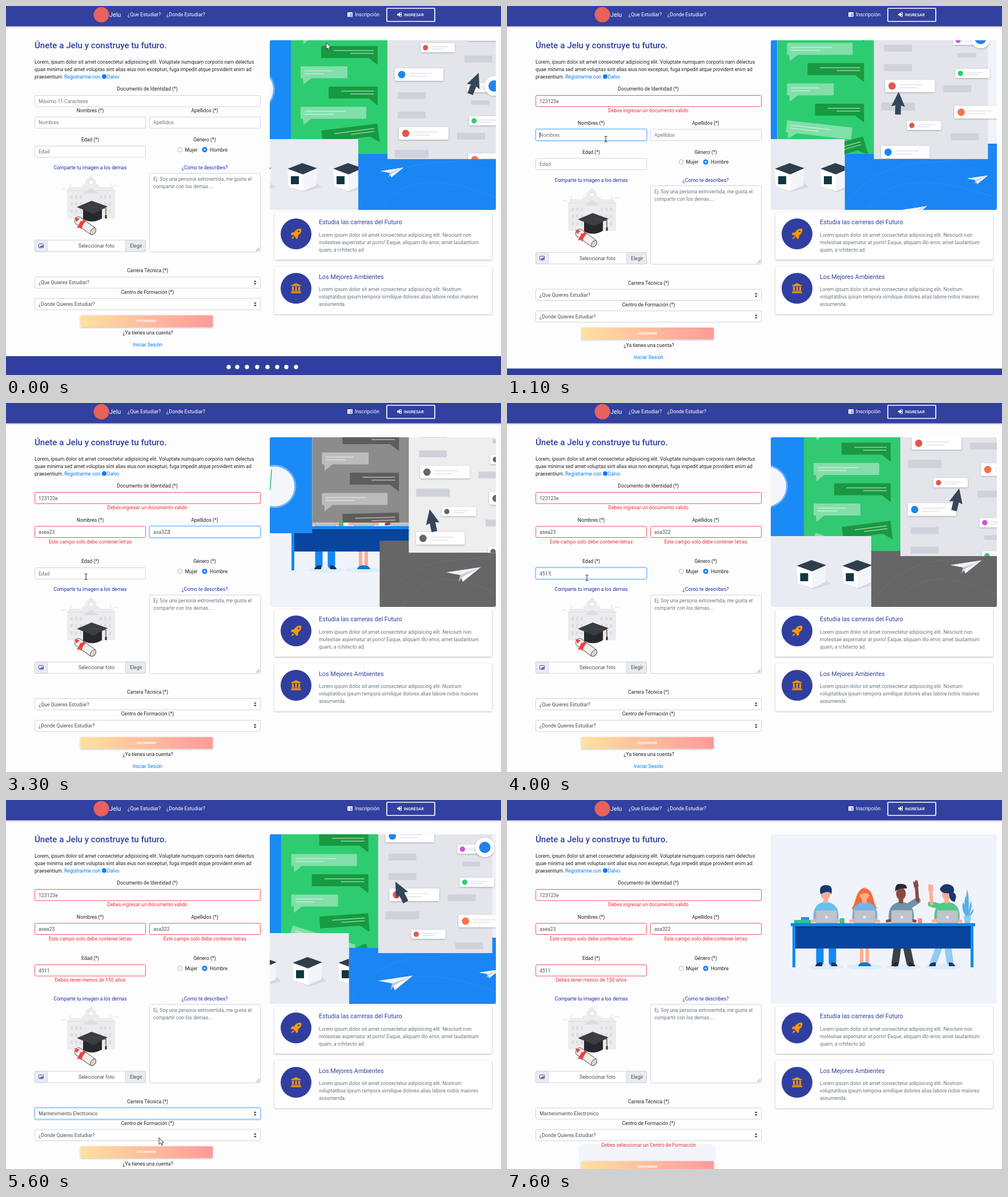
An HTML page that plays this animation: 867x646 px, repeating every 7700 ms.

```html
<!DOCTYPE html>
<html lang="es">
<head>
<meta charset="utf-8">
<style>
html, body { margin: 0; width: 100%; height: 100%; overflow: hidden; background: #fdfdfe; }
svg { display: block; width: 867px; height: 646px; font-family: Roboto, Arial, sans-serif; }
</style>
</head>
<body>
<svg id="stage" viewBox="0 0 867 646" xmlns="http://www.w3.org/2000/svg"></svg>
<script>
const LOOP = 7700, SCENE_LOOP = 4900, STEP = 100, ROW = 21.6;
const INK = '#212529', MUTED = '#6c757d', INDIGO = '#303f9f', LINK = '#007bff', RED = '#f0303c', BORDER = '#ced4da';

const clamp = x => Math.max(0, Math.min(1, x));
const ease = (t, a, b) => { const k = clamp((t - a) / (b - a)); return 1 - (1 - k) ** 2; };
const lerp = (a, b, k) => a + (b - a) * k;

// Piecewise linear track: rows of [time, ...values], extended past both ends.
function track(keys, t) {
  let i = 1;
  while (i < keys.length - 1 && t > keys[i][0]) i++;
  const a = keys[i - 1], b = keys[i], k = (t - a[0]) / (b[0] - a[0]);
  return a.slice(1).map((v, j) => lerp(v, b[j + 1], k));
}

function mix(from, to, k) {
  const part = (c, i) => parseInt(c.substr(1 + 2 * i, 2), 16);
  return `rgb(${[0, 1, 2].map(i => Math.round(lerp(part(from, i), part(to, i), k)))})`;
}

const rect = (x, y, w, h, fill, r = 0, more = '') =>
  `<rect x="${x}" y="${y}" width="${Math.max(0, w)}" height="${Math.max(0, h)}" rx="${r}" fill="${fill}" ${more}/>`;
const dot = (x, y, r, fill, more = '') => `<circle cx="${x}" cy="${y}" r="${r}" fill="${fill}" ${more}/>`;
const path = (d, fill, more = '') => `<path d="${d}" fill="${fill}" ${more}/>`;
const limb = (d, color, w) => path(d, 'none', `stroke="${color}" stroke-width="${w}" stroke-linecap="round" stroke-linejoin="round"`);
const group = (transform, body) => `<g transform="${transform}">${body}</g>`;
const text = (x, y, s, fill = INK, size = 8.69, more = '') =>
  `<text x="${x}" y="${y + size * .35}" fill="${fill}" font-size="${size}" ${more}>${s}</text>`;
const centered = (x, y, s, fill, size, more = '') => text(x, y, s, fill, size, 'text-anchor="middle" ' + more);

/* ---------- page chrome ---------- */

const DEFS = `<defs>
  <clipPath id="view"><rect x="462" y="60" width="396" height="297" rx="3"/></clipPath>
  <linearGradient id="warm"><stop offset="0" stop-color="#ffe0a0"/><stop offset="1" stop-color="#ff9a9a"/></linearGradient>
  <filter id="lift" x="-10%" y="-20%" width="120%" height="150%"><feDropShadow dx="0" dy="1" stdDeviation="1.4" flood-opacity=".28"/></filter>
</defs>`;

function header() {
  const list = rect(598, 11, 9, 8, '#fff', 1) +
    [13.5, 15.5, 17.5].map(y => path(`M599.5 ${y}h1M602 ${y}h4`, 'none', `stroke="${INDIGO}" stroke-width=".8"`)).join('');
  const enter = path('M685 13.5h3v-2.5l4 4-4 4v-2.5h-3z', '#fff') + limb('M690.5 11.5h2v7h-2', '#fff', 1);
  return rect(-5, -5, 877, 40.5, INDIGO, 0, 'filter="url(#lift)"') + dot(167, 15.3, 13.5, '#e9615c') +
    text(181, 15, 'Jelu', '#fff', 10.84) + text(213, 15, '¿Que Estudiar?', '#fff', 8.8) +
    text(281, 15, '¿Donde Estudiar?', '#fff', 8.8) + list + text(611, 15, 'Inscripción', '#fff', 8.8) +
    rect(667, 4, 84, 23, 'none', 1, 'stroke="#fff" stroke-width="1.7"') + enter +
    text(697, 15, 'INGRESAR', '#fff', 7.3, 'font-weight="500"');
}

function infoCard(y, title, lines, icon) {
  return rect(470, y, 381, 83, '#fff', 2, 'filter="url(#lift)"') + dot(508, y + 38, 27, INDIGO) + group(`translate(508 ${y + 38})`, icon) +
    text(548, y + 17.7, title, INDIGO, 10.84) + lines.map((s, i) => text(548, y + 39.5 + 13 * i, s, MUTED)).join('');
}

const ROCKET = path('M9-9C3-10-1-7-3-3L-8-2-9 2-5 2 0 7 0 9 3 8 4 2C8 0 10-4 9-9Z', '#ff9800') +
  path('M-5 4-9 9-3 7Z', '#ff9800') + dot(4.5, -4.5, 1.6, INDIGO);
const BANK = path('M-9-4V-5L0-9 9-5V-4ZM-7-3h3V4h-3ZM-1.5-3h3V4h-3ZM4-3h3V4h-3ZM-8 4.5H8V6H-8ZM-9 6.5H9V8.5H-9Z', '#ff9800');

const sidebar = () =>
  infoCard(361, 'Estudia las carreras del Futuro', [
    'Lorem ipsum dolor sit amet consectetur adipisicing elit. Nesciunt non',
    'molestiae aspernatur at porro! Eaque, aliquam illo error, amet laudantium',
    'quam, a rchitecto ad.'], ROCKET) +
  infoCard(456.3, 'Los Mejores Ambientes', [
    'Lorem ipsum dolor sit amet consectetur adipisicing elit. Nostrum',
    'voluptatibus ipsum tempora similique dolores alias labore nobis maiores',
    'assumenda.'], BANK);

/* ---------- form ---------- */

function box(x, y, w, h, { focus, error } = {}) {
  const glow = focus ? rect(x - .5, y - .5, w + 1, h + 1, 'none', 3, 'stroke="#bfdeff" stroke-width="3"') : '';
  return glow + rect(x, y, w, h, '#fff', 2, `stroke="${focus ? '#80bdff' : error ? '#f2505c' : BORDER}"`);
}

function field(x, y, w, hint, { value = '', focus, error, caret } = {}) {
  const bar = focus && caret ? '<tspan dx="-1">|</tspan>' : '';
  return box(x, y, w, 19.6, { focus, error }) +
    (value ? text(x + 6.5, y + 10, value + bar, '#495057') : text(x + 6.5, y + 10, hint, MUTED) +
      (bar && path(`M${x + 7} ${y + 5}v10`, 'none', 'stroke="#222" stroke-width=".8"')));
}

const select = (y, value, state) => box(50.5, y, 395, 19.6, state) + text(57, y + 10, value, '#495057') +
  path(`M434 ${y + 9}l2.3-3 2.3 3ZM434 ${y + 11}l2.3 3 2.3-3Z`, '#343a40');

function graduation() {
  const wall = '#ececef', trim = '#dcdce1';
  const windows = [113, 121, 129, 164, 172, 180].map(x =>
    [331, 343, 356].map(y => rect(x, y, 4, 7, trim, 2)).join('')).join('');
  const building = path('M107 372V324l3-7h23v-3l6-3v-6l10-8 9 8v6l6 3v3h23l4 7v48Z', wall) + dot(149, 309, 4, '#fff', `stroke="${trim}"`) +
    path('M135 328l14-9 14 9Z', trim) + windows + limb('M97 321q4-4 8-1M188 316q5-5 9 0M106 323h86', trim, 1) +
    path('M149 297v7M113 317v-6M183 317v-7', 'none', `stroke="${trim}"`);
  const cap = path('M135 355v18q16 9 33-1V355Z', '#25282c') + path('M124 352 150 341 178 351 153 364Z', '#3a3d42') +
    limb('M152 352l23 2v15', '#5a4632', 1.2) + rect(173.5, 366, 3, 6, '#393028');
  const scroll = group('translate(138 384) rotate(36)',
    rect(-20, -7, 42, 14, '#f3eee9', 6, 'stroke="#65615e"') + `<ellipse cx="18" cy="0" rx="4" ry="6.5" fill="#ddd5cc" stroke="#65615e"/>` + rect(-8, -7, 5, 14, '#e64545'));
  return building + cap + scroll + path('M129 372l-9-2 3 8ZM131 376l-7 13 5-1 3 3 4-12Z', '#e64545');
}

function upload(y) {
  return rect(50.5, y, 194, 20, '#fff', 2, `stroke="${BORDER}"`) + rect(50.5, y, 22, 20, '#e9ecef', 2, `stroke="${BORDER}"`) +
    rect(209.5, y, 35, 20, '#e9ecef', 2, `stroke="${BORDER}"`) + rect(57.5, y + 6.5, 8, 6.5, '#fff', 1, `stroke="${INDIGO}"`) +
    path(`M58.5 ${y + 12}l2-2 1 1 2-3 1.5 4Z`, INDIGO) + text(127, y + 10, 'Seleccionar foto', '#495057') + text(217, y + 10, 'Elegir', '#495057');
}

function form(t) {
  const typed = (s, start, pace) => s.slice(0, Math.max(0, Math.floor((t - start) / pace) + 1));
  const between = (a, b) => t >= a && t < b;
  const bad = { id: t >= 800, name: t >= 2400, last: t >= 3400, age: t >= 4300, center: t >= 6500 };
  const d1 = bad.id ? ROW : 0, d2 = d1 + (bad.name ? ROW : 0), d3 = d2 + (bad.age ? ROW : 0);
  const dEnd = d3 + (bad.center ? 26 : 0);
  const warn = (on, x, y, s) => on ? centered(x, y, s, RED) : '';
  const letters = 'Este campo solo debe contener letras';
  const navy = '#1f2cae';

  const intro = text(50, 68.5, 'Únete a Jelu y construye tu futuro.', INDIGO, 15.1, 'font-weight="500"') +
    text(50, 97.5, 'Lorem, ipsum dolor sit amet consectetur adipisicing elit. Voluptate numquam corporis nam delectus') +
    text(50, 110.5, 'quae minima sed amet voluptas sint alias eius non excepturi, fuga impedit atque provident enim ad') +
    text(50, 123.5, 'praesentium.') + text(102, 123.5, 'Registrarme con', LINK) + dot(172, 123.5, 4, LINK) + text(176.7, 123.5, 'Dalvo', LINK);

  const identity = centered(247.5, 145, 'Documento de Identidad (*)') +
    field(50.5, 156.5, 395, 'Máximo 11 Caracteres', { value: typed('123123e', 300, 70), focus: between(200, 1000), error: bad.id, caret: true }) +
    warn(bad.id, 247.5, 183, 'Debes ingresar un documento valido');

  const names = centered(147.5, 183, 'Nombres (*)') + centered(348, 183, 'Apellidos (*)') +
    field(50.5, 194.3, 194, 'Nombres', { value: typed('asea23', 1300, 100), focus: between(1000, 2400), error: bad.name, caret: t < 2000 }) +
    field(251.5, 194.3, 194, 'Apellidos', { value: typed('asa322', 2600, 110), focus: between(2400, 3400), error: bad.last, caret: true }) +
    warn(bad.name, 147.5, 221.2, letters) + warn(bad.last, 348, 221.2, letters);

  const about = centered(147.5, 234, 'Edad (*)') + centered(348, 234, 'Género (*)') +
    field(50.5, 245.3, 194, 'Edad', { value: typed('4511', 3600, 100), focus: between(3400, 4300), error: bad.age, caret: true }) +
    warn(bad.age, 147.5, 272, 'Debes tener menos de 150 años') +
    dot(305, 251.5, 4, '#fff', 'stroke="#adb5bd"') + text(313.5, 251.5, 'Mujer') +
    dot(348, 251.5, 4.5, LINK) + dot(348, 251.5, 1.8, '#fff') + text(357, 251.5, 'Hombre');

  const profile = centered(147.5, 283, 'Comparte tu imagen a los demas', navy) + centered(348, 283, '¿Como te describes?', navy) +
    graduation() + upload(410) + box(251.5, 293, 194, 137.5) +
    text(258, 303, 'Ej: Soy una persona extrovertida, me gusta el', MUTED) + text(258, 316, 'compartir con los demas....', MUTED) +
    path('M438 429l6-6M441.5 429l2.5-2.5', 'none', 'stroke="#666" stroke-width=".9"') +
    centered(248, 463, 'Carrera Técnica (*)') +
    select(474.3, t >= 5400 ? 'Mantenimiento Electronico' : '¿Que Quieres Estudiar?', { focus: between(5000, 5900) }) +
    centered(248, 501, 'Centro de Formación (*)') +
    (bad.center ? rect(126, 538, 240, 70, '#f3f5fa', 7) : '') +
    select(512.2, '¿Donde Quieres Estudiar?') + warn(bad.center, 248, 539, 'Debes seleccionar un Centro de Formación');

  const actions = rect(130.5, 541.5, 231.5, 20.5, 'url(#warm)', 1, 'filter="url(#lift)"') +
    centered(246, 551.5, 'INSCRIBIRME', '#fff', 5.6, 'font-weight="700"') +
    centered(248.5, 572, '¿Ya tienes una cuenta?') + centered(248, 593, 'Iniciar Sesión', LINK) +
    rect(0, 613, 867, 80, INDIGO) + [390, 405, 422, 440, 458, 475, 491, 508].map(x => dot(x, 632, 3.7, '#fff')).join('');

  const down = (dy, body) => group(`translate(0 ${dy})`, body);
  return intro + identity + down(d1, names) + down(d2, about) + down(d3, profile) + down(dEnd, actions);
}

/* ---------- banner: team at a desk ---------- */

const laptop = x => rect(x, 193, 37, 23, '#bfc3cb', 2, 'stroke="#9da3ae" stroke-width=".6"') + dot(x + 18.5, 205, 2.6, '#e8eaee');
const shoes = (a, b, c) => path(`M${a - 6} 291q1-7 12-7v7ZM${b - 4} 291v-7q10 1 11 7Z`, c);

function team(v) {
  const wave = 4 * Math.sin((v - 2200) / 500 * 2 * Math.PI);
  const skin = '#ffad94', brown = '#8a4c42';
  const turn = (deg, x, y, body) => group(`rotate(${deg} ${x} ${y})`, body);
  const sit = (x, shirt, face) => path(`M${x - 21} 212q-4-31 21-34q27 3 22 34Z`, shirt) + rect(x - 4, 168, 8, 13, face, 3) +
    `<ellipse cx="${x}" cy="164" rx="8.5" ry="11" fill="${face}"/>` + limb(`M${x - 24} 212l16-3M${x + 25} 212l-16-3`, face, 5);
  const barOut = track([[2200, 818], [2400, 820], [2550, 860]], Math.max(2200, v))[0];
  const redHead = path('M626 155c-15 0-14 24-22 35 5 9 36 9 44-1-8-9-5-34-22-34Z', '#f46b39');
  const armUp = limb('M705 185l14-9', '#6e93aa', 11) + limb('M719 176l-2-26', brown, 6) + path('M713 153l-2-11 3 2 2-4 3 1 2 9-2 6Z', brown);
  const otherArm = limb('M757 186l-15-4', '#4ecb87', 10) + limb('M744 181l-2-23', skin, 6) + path('M738 160l0-12 3-1 2 2 3-1 1 12Z', skin);
  const plant = [[-7, -27], [0, -50], [7, -30], [-3, -38], [11, -16]].map(([dx, dy]) =>
    path(`M806 206q${dx - 5} ${dy / 2} ${dx} ${dy}q${6 - dx / 3} ${-dy / 2} ${-dx} ${-dy}Z`, '#59aee8')).join('') + path('M800 203h13l-2 13h-9Z', '#8dc8f3');
  return rect(462, 60, 396, 297, '#f1f3fa') + (v > 1500 && barOut < 858 ? rect(barOut, 234, 40, 13, '#a9d8f8') : '') +
    [560, 626, 694, 764].map(x => `<ellipse cx="${x}" cy="292" rx="31" ry="5" fill="#d9effb"/>`).join('') +
    limb('M548 257l0 27M570 257l0 27', '#1488f4', 13) + shoes(546, 572, '#252d4e') +
    limb('M621 257v28M631 257v28', skin, 6) + shoes(621, 631, '#1378c7') +
    limb('M684 257l-4 28M700 257l6 28', '#3b404d', 13) + shoes(679, 708, '#222838') +
    limb('M757 257l-10 27M772 257l4 27', '#8fcdf1', 12) + shoes(745, 778, '#1b3867') +
    sit(558, '#65c1f2', skin) + path('M549 165q-4-16 10-16 13 0 9 16-4-8-19 0Z', '#123c70') +
    redHead + sit(626, '#70b5ea', skin) + path('M617 166q1-13 10-11 10 1 9 11-8-6-19 0Z', '#f46b39') +
    turn(wave, 705, 185, armUp) + sit(690, '#6e93aa', brown) + path('M680 160q-1-15 11-13 10 0 9 8-15-1-20 5Z', '#272735') +
    turn(-wave, 757, 186, otherArm) + sit(770, '#4ecb87', skin) + path('M758 156q5-11 17-8 11 4 7 14 8 4 2 16-9 0-10-15-12 2-16-7Z', '#17386d') +
    [541, 608, 673, 753].map(laptop).join('') + rect(515, 205, 14, 6, '#2f8fe5') + rect(503, 210, 29, 6, '#35c383') +
    rect(583, 207, 8, 9, '#39c57d', 1) + rect(720, 207, 7, 9, '#f28c7d', 1) + plant +
    rect(500, 220, 5, 73, '#0f8cf4') + rect(812, 220, 5, 73, '#0f8cf4') + rect(505, 220, 307, 40, '#07459f') +
    rect(505, 220, 307, 4, '#053987') + rect(497, 215.5, 323, 5.5, '#0b88fb', 1);
}

/* ---------- banner: sliding panels ---------- */

// Each row: x, y, width, height, dot colour (none for a grey block).
const FEED = [
  [58, 65, 60, 16, '#e2574c'], [13, 109, 85, 22, '#1a86f0'], [18, 151, 49, 12], [18, 185, 49, 12], [20, 212, 87, 22, '#e2574c'], [13, 252, 59, 14],
  [135, 87, 49, 12], [139, 135, 61, 16, '#d152d9'], [147, 165, 32, 8], [143, 193, 60, 16, '#2ecc71'], [122, 222, 49, 12], [141, 258, 85, 22, '#fb7346'],
];
// x, width and whether the reply is dark.
const BUBBLES = [[53, 99, true], [17, 82, false], [66, 86, true], [17, 115, false]];

function bubble(x, y, w, dark, color) {
  const tail = dark ? `M${x + w - 17} ${y + 20}h17v13Z` : `M${x + 4} ${y + 20}h16l-15 12Z`;
  const line = (a, b, dy) => path(`M${x + a} ${y + dy}H${x + b}`, 'none', 'stroke="#fff" stroke-opacity=".55" stroke-width="1.5"');
  const tilt = Math.max(0, y - 188) * (dark ? -.3 : .35);
  return group(`rotate(${tilt} ${x + w / 2} ${y})`, rect(x, y, w, 21, color, 1) + path(tail, color) +
    (dark ? line(22, w - 7, 8) + line(w - 48, w - 7, 13) : line(7, w * .68, 8) + line(7, w * .5, 13)));
}

function feedItem([x, y, w, h, color], k) {
  if (!color) return rect(x, y, w, h, '#cfd2db', 1);
  const r = h * .29, line = (dy, len) => path(`M${x + h + 3} ${y + h * dy}h${len}`, 'none', 'stroke="#dfe2e9" stroke-width="1.5"');
  return rect(x, y, w, h, '#fff', 2, 'filter="url(#lift)"') + dot(x + h * .55, y + h / 2, r, mix('#666666', color, k)) +
    line(.4, w * .48) + line(.64, w * .36);
}

const cube = x => group(`translate(${x} 300)`,
  path('M-24 16 2 26 34 17 22 8Z', '#d6d9e1') + path('M-26-15 0-25 26-16 1-5Z', '#2f3e4c') + path('M-26-15 1-5V24L-24 16Z', '#fff') +
  path('M1-5 26-16 24 14 1 24Z', '#f4f5f9') + rect(-20, -2, 14, 14, '#12363f'));
const plane = (x, y, s) => group(`translate(${x} ${y}) scale(${s})`,
  path('M-21-1 19-7-2 10-5 2Z', '#fff') + path('M19-7-5 2-7 10-2 4Z', '#bfcbd9') + path('M-21-1 19-7-5 2Z', '#eef2f7'));

function panels(v) {
  const p = 499 - .0233 * v, q = p + 169, b = p + 118;
  const k = ease(v, -1300, -800), kFloor = ease(v, -500, 0);
  const blueH = 175 * ease(v, -2000, -1500), greenH = 199 * ease(v, -1950, -1250), feedH = 208 * ease(v, -2000, -1520);
  const floorY = lerp(357, 241, ease(v, -2000, -1600)), cubesY = lerp(357, 233, ease(v, -1550, -1000));
  const [chatY] = track([[-1600, 193], [-200, 88], [0, 70], [700, -12], [1100, -42]], v);
  const [feedY] = track([[-1600, 117], [-200, 16], [0, 0], [700, -57], [1100, -83]], v);
  const [cubeX] = track([[-200, 540], [0, 519], [700, 448], [1100, 415]], v);
  const [ax, ay, turn] = track([[-1600, 742, 186, -12], [-200, 842, 113, 38], [0, 828, 117, 22], [700, 682, 143, -27], [1100, 686, 150, 2]], v);
  const fly = track([[-1600, 803, 298, 1.5], [-200, 808, 272, 1.2], [0, 677, 290, 1], [700, 684, 318, 1.5], [1100, 715, 358, 1.1]], v);
  const clip = (id, x, y, w, h, body) =>
    `<clipPath id="${id}">${rect(x, y, w, h, '#000')}</clipPath><g clip-path="url(#${id})">${body}</g>`;

  let chat = rect(p, 60, 170, greenH, mix('#8c8c8c', '#2ecc71', k));
  for (let i = -5; i < 9; i++) {
    const [x, w, dark] = BUBBLES[(i + 8) % 4];
    chat += bubble(p + x, chatY + i * 35.5, w, dark, dark ? mix('#5d5d5d', '#179a40', k) : mix('#bcbcbc', '#82dfa9', k));
  }
  let feed = '';
  for (const lap of [-219, 0, 219]) {
    feed += group(`translate(${q} ${feedY + lap})`, FEED.map(item => feedItem(item, k)).join(''));
  }
  feed += group(`translate(${q + 187} ${feedY + 140})`, dot(0, 0, 17, '#fff', 'filter="url(#lift)"') + dot(0, 0, 10, mix('#777777', '#2481e8', k)));
  const arrow = group(`translate(${ax} ${ay}) rotate(${turn})`, path('M0 0 12 26 5 24V40H-5V24L-12 26Z', '#34465a'));
  const floor = rect(b, floorY, 858 - b, 357 - floorY, mix('#666666', '#1a86f4', kFloor)) +
    path(`M${b} 350Q${b + 50} 280 ${b + 130} 275T868 262M${b + 40} 357Q${b + 90} 270 868 340`, 'none', 'stroke="#fff" stroke-opacity=".25" stroke-dasharray="1 3"') +
    plane(...fly) + (v > 0 ? plane(lerp(888, 848, v / 700), 303, .9) : '');
  const cubes = rect(462, cubesY, b - 462, 124, '#e8ebf1') +
    group(`translate(0 ${cubesY - 233})`, [-80, 0, 80, 160].map(dx => cube(cubeX + dx)).join(''));

  return clip('floorClip', b, floorY, 858 - b, 130, floor) +
    clip('blueClip', 462, 60, p - 462, blueH, rect(462, 60, 90, 190, '#1a8af5') +
      dot(p - 66, 146, 38, '#69b3f8') + dot(p - 66, 146, 35, '#f3f7fb') + limb(`M${p - 74} 152l3-35`, '#2bbd70', 1.5)) +
    clip('chatClip', p, 60, 170, greenH, chat) +
    clip('cubeClip', 462, cubesY, b - 462, 124, cubes) +
    clip('feedClip', q, 60, 858 - q, feedH, rect(q, 60, 200, feedH, mix('#eeeeef', '#e3e5eb', k)) + feed + arrow);
}

function banner(t) {
  const v = t % SCENE_LOOP;
  const lead = v < 1700 ? v : v - SCENE_LOOP;
  const shown = lead > -2000 ? 1 - clamp((lead - 1300) / 300) : 0;
  return `<g clip-path="url(#view)">${team(v)}${shown ? `<g opacity="${shown}">${panels(lead)}</g>` : ''}</g>`;
}

/* ---------- pointer ---------- */

const MOUSE = [[0, 561, 64], [300, 200, 168], [800, 190, 172], [1100, 173, 233], [1800, 175, 234], [2200, 305, 224], [2700, 305, 226],
  [3300, 140, 304], [4000, 140, 306], [4700, 238, 341], [5100, 270, 549], [5400, 270, 575], [5600, 268, 591], [6000, 250, 617],
  [6500, 250, 617], [6900, 505, 590], [7200, 880, 560]];

function pointer(t) {
  const [x, y] = track(MOUSE, t);
  const overText = (t >= 300 && t < 2000) || (t >= 3000 && t < 4300);
  return group(`translate(${x} ${y})`, overText
    ? path('M-2.5-5Q0-5 0-4Q0-5 2.5-5M0-4V4M-2.5 5Q0 5 0 4Q0 5 2.5 5', 'none', 'stroke="#222"')
    : path('M0 0V12L2.8 9.5 4.7 13.5 6.6 12.7 4.8 8.8H8.3Z', t < 250 ? '#fff' : '#fafafa', 'stroke="#222" stroke-width=".9"'));
}

const stage = document.getElementById('stage');
const fixed = DEFS + header() + sidebar();
let last = -1;

function render(now) {
  const t = Math.floor((now % LOOP) / STEP) * STEP;
  if (t !== last) {
    last = t;
    stage.innerHTML = fixed + form(t) + banner(t) + pointer(t);
  }
}

const start = performance.now();
function tick() {
  render(performance.now() - start);
  requestAnimationFrame(tick);
}
tick();
</script>
</body>
</html>
```
